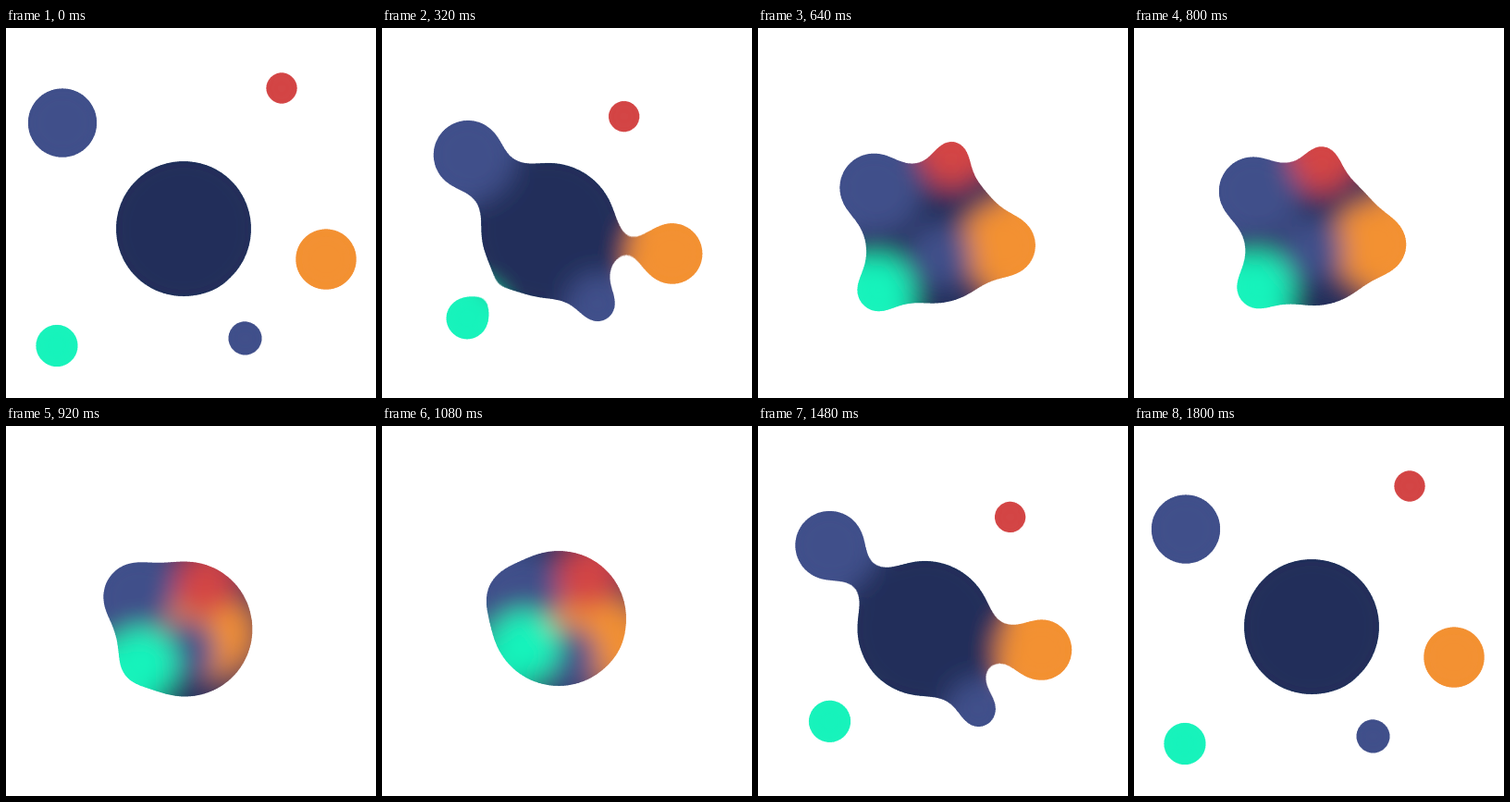
Recreate the animation shown at these times as an HTML page. Size 400 by 400 pixels, loop 2360 ms.

```html
<!DOCTYPE html>
<html lang="en">
<head>
<meta charset="utf-8">
<title>Gooey circles</title>
<style>
  html, body { margin: 0; width: 100%; height: 100%; overflow: hidden; background: #fff; }
  svg { display: block; width: 400px; height: 400px; }
</style>
</head>
<body>
<svg viewBox="0 0 400 400">
  <defs>
    <filter id="goo" filterUnits="userSpaceOnUse" x="-60" y="-60" width="520" height="520"
            color-interpolation-filters="linearRGB">
      <feGaussianBlur id="blur"/>
      <feColorMatrix id="cut"/>
    </filter>
  </defs>
  <g id="balls" filter="url(#goo)"></g>
</svg>
<script>
const LOOP = 2360, MOVE = 1800, STEP = 40;
const SIGMA = 14, LEVEL = 0.82, GAIN = 55;
const GATHERED = 760, SINK = 800;

// Steady balls ease evenly; eager ones set off late and start fast
const STEADY = { leave: 930, inBias: 1, outBias: 1 };
const EAGER = { leave: 1040, inBias: 0.85, outBias: 0.65 };

const key = (t, [x, y], bias = 1) => ({ t, x, y, bias });

// From home to the rim of the big ball, into its core and out again
function visit(pace, home, rim, core, end = home) {
  return [
    key(0, home), key(GATHERED, rim, pace.inBias), key(SINK, rim),
    key(pace.leave, core), key(MOVE, end, pace.outBias)
  ];
}

// The big ball wanders near the middle
const wander = [
  key(0, [192, 217]), key(360, [180, 219]), key(800, [195, 227]),
  key(1080, [191, 208]), key(1440, [180, 219]), key(MOVE, [192, 217])
];

// Back to front; r is the radius seen after the goo filter
const balls = [
  { r: 72.5, fill: '#242d5a', path: wander },
  { r: 36.5, fill: '#414f8a',
    path: visit(EAGER, [61, 102.5], [129, 176.5], [156, 193], [56, 111.5]) },
  { r: 32, fill: '#f39132',
    path: visit(STEADY, [346, 250], [261.5, 234], [217, 224]) },
  { r: 15.5, fill: '#d34545',
    path: visit(STEADY, [298, 65], [203, 145], [215, 174]) },
  { r: 17, fill: '#414f8a',
    path: visit(STEADY, [258.5, 335.5], [193, 240], [193.5, 242.5]) },
  { r: 21.7, fill: '#14f3bb',
    path: visit(EAGER, [55, 343.5], [134, 280.5], [160, 231]) }
];

// Blurred value of a disc of radius R at distance d < R from its centre
function blurred(d, R) {
  const n = 180;
  let sum = 0;
  for (let i = 0; i < n; i++) {
    const a = (i + 0.5) * Math.PI / n;
    const len = Math.sqrt(R * R - (d * Math.sin(a)) ** 2) - d * Math.cos(a);
    sum += 1 - Math.exp(-len * len / (2 * SIGMA * SIGMA));
  }
  return sum / n;
}

// Disc radius that the filter shrinks to r
function drawnRadius(r) {
  let lo = r, hi = r + 4 * SIGMA;
  for (let i = 0; i < 30; i++) {
    const mid = (lo + hi) / 2;
    if (blurred(r, mid) < LEVEL) lo = mid; else hi = mid;
  }
  return lo;
}

const smooth = p => p * p * (3 - 2 * p);

function pointAt(path, t) {
  const i = Math.max(1, path.findIndex(k => t <= k.t));
  const a = path[i - 1], b = path[i];
  const p = smooth(((t - a.t) / (b.t - a.t)) ** b.bias);
  return [a.x + (b.x - a.x) * p, a.y + (b.y - a.y) * p];
}

const $ = id => document.getElementById(id);
$('blur').setAttribute('stdDeviation', SIGMA);
$('cut').setAttribute('values',
  `1 0 0 0 0  0 1 0 0 0  0 0 1 0 0  0 0 0 ${GAIN} ${0.5 - GAIN * LEVEL}`);

for (const ball of balls) {
  ball.el = document.createElementNS('http://www.w3.org/2000/svg', 'circle');
  ball.el.setAttribute('r', drawnRadius(ball.r).toFixed(2));
  ball.el.setAttribute('fill', ball.fill);
  $('balls').append(ball.el);
}

function draw(ms) {
  const t = Math.min(MOVE, Math.floor(ms % LOOP / STEP) * STEP);
  for (const { el, path } of balls) {
    const [x, y] = pointAt(path, t);
    el.setAttribute('cx', x.toFixed(2));
    el.setAttribute('cy', y.toFixed(2));
  }
}

const start = performance.now();
function tick() {
  draw(performance.now() - start);
  requestAnimationFrame(tick);
}
tick();
</script>
</body>
</html>
```
